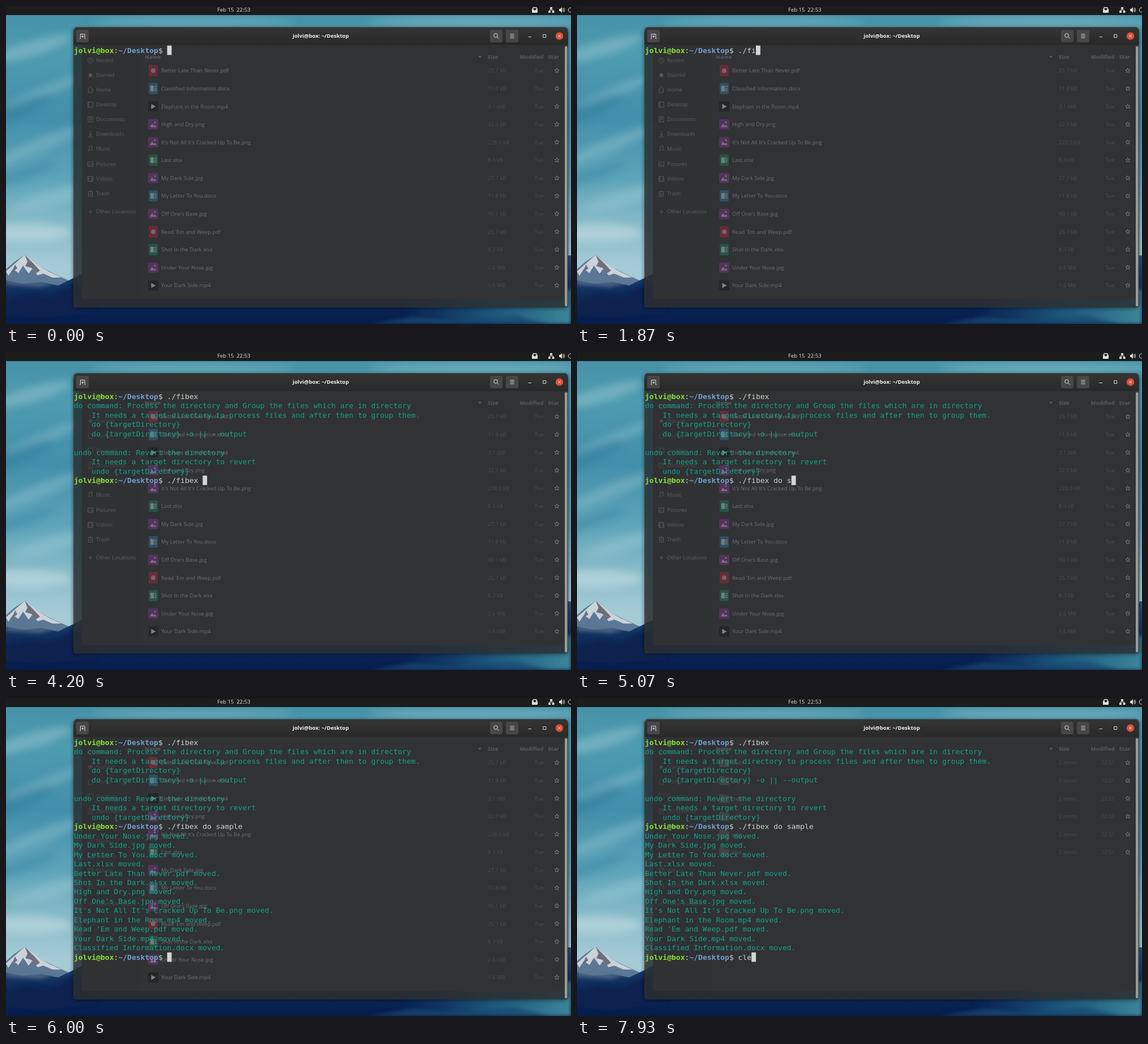
An HTML page that plays this animation: 998 px wide and 561 px high, repeating every 8000 ms.

```html
<!DOCTYPE html>
<html lang="en">
<head>
<meta charset="utf-8">
<title>Terminal session</title>
<style>
html, body { margin: 0; width: 100%; height: 100%; overflow: hidden; background: #10233f; }
svg { display: block; width: 998px; height: 561px; }
text { white-space: pre; }
.ui { font: 9.5px "Open Sans", "Noto Sans", sans-serif; }
.bold { font-weight: 700; }
.end { text-anchor: end; }
.mid { text-anchor: middle; }
.term { font: 13.02px "DejaVu Sans Mono", monospace; fill: #d0d3cf; }
.out { fill: #16a089; }
.user { fill: #8ae234; font-weight: 700; }
.path { fill: #729fcf; font-weight: 700; }
.line { fill: none; stroke: currentColor; }
use { opacity: .55; }
</style>
</head>
<body>
<svg viewBox="0 0 998 561">
  <defs>
    <linearGradient id="sky" x1="0" y1="0" x2="0" y2="1">
      <stop offset="0" stop-color="#438fa6"/>
      <stop offset=".15" stop-color="#4f9bb0"/>
      <stop offset=".35" stop-color="#438fab"/>
      <stop offset=".55" stop-color="#5fa5ba"/>
      <stop offset=".7" stop-color="#8bbdca"/>
      <stop offset=".82" stop-color="#a5cbd5"/>
    </linearGradient>
    <linearGradient id="hill" x1="0" y1="0" x2="0" y2="1">
      <stop offset="0" stop-color="#2c5480"/>
      <stop offset=".55" stop-color="#0f2c5c"/>
      <stop offset="1" stop-color="#061c4c"/>
    </linearGradient>
    <linearGradient id="haze" x1="0" y1="0" x2="1" y2="0">
      <stop offset=".5" stop-color="#1d5a80" stop-opacity="0"/>
      <stop offset=".75" stop-color="#256a8a" stop-opacity=".7"/>
      <stop offset="1" stop-color="#3d8799"/>
    </linearGradient>
    <linearGradient id="bar" x1="0" y1="0" x2="0" y2="1">
      <stop offset="0" stop-color="#343434"/>
      <stop offset="1" stop-color="#292929"/>
    </linearGradient>
    <filter id="soft" x="-50%" y="-80%" width="200%" height="260%"><feGaussianBlur stdDeviation="7"/></filter>
    <filter id="fuzz" x="-20%" y="-20%" width="140%" height="140%"><feGaussianBlur stdDeviation="3"/></filter>

    <symbol id="pdf" overflow="visible">
      <rect x="-8" y="-10" width="16" height="20" rx="2" fill="#94283f"/>
      <circle r="4" fill="#b98a95"/>
    </symbol>
    <symbol id="docx" overflow="visible">
      <rect x="-8" y="-10" width="16" height="20" rx="2" fill="#2f6a8c"/>
      <path d="M-5-5h6v10h-6zM2-4h4v1.5H2zM2-.7h4v1.5H2zM2 2.6h4v1.5H2z" fill="#a9bac2"/>
    </symbol>
    <symbol id="xlsx" overflow="visible">
      <rect x="-8" y="-10" width="16" height="20" rx="2" fill="#1d7554"/>
      <path d="M-5-5h6v10h-6zM2-4h4v1.5H2zM2-.7h4v1.5H2zM2 2.6h4v1.5H2z" fill="#a9beb4"/>
    </symbol>
    <symbol id="image" overflow="visible">
      <rect x="-9" y="-9" width="18" height="18" rx="2" fill="#71367f"/>
      <path d="M-6 5l4-6 3 4 2-2 3 4z" fill="#b9a3bf"/>
      <circle cx="3" cy="-3.5" r="1.5" fill="#b9a3bf"/>
    </symbol>
    <symbol id="video" overflow="visible">
      <rect x="-9" y="-9" width="18" height="18" rx="2" fill="#1c1e20"/>
      <path d="M-3.5-4.5v9l8-4.5z" fill="#c2c3c4"/>
    </symbol>
    <symbol id="folder" overflow="visible">
      <path d="M-9-6q0-2 2-2h5l2 2h7q2 0 2 2v10q0 2-2 2H-7q-2 0-2-2z" fill="#515356"/>
    </symbol>
  </defs>

  <!-- wallpaper -->
  <rect width="998" height="561" fill="url(#sky)"/>
  <g filter="url(#soft)" fill="#8fc2cd">
    <ellipse cx="45" cy="75" rx="75" ry="13" transform="rotate(-16 45 75)" opacity=".55"/>
    <ellipse cx="70" cy="150" rx="75" ry="9" transform="rotate(-22 70 150)" opacity=".45"/>
    <ellipse cx="20" cy="185" rx="70" ry="14" transform="rotate(-24 20 185)" fill="#34809f" opacity=".6"/>
    <ellipse cx="60" cy="245" rx="85" ry="12" transform="rotate(-22 60 245)" opacity=".45"/>
    <ellipse cx="20" cy="300" rx="70" ry="12" transform="rotate(-18 20 300)" fill="#3f8ba8" opacity=".55"/>
    <ellipse cx="80" cy="340" rx="75" ry="15" transform="rotate(-16 80 340)" opacity=".6"/>
    <ellipse cx="35" cy="400" rx="80" ry="16" fill="#c2dde2" opacity=".6"/>
    <ellipse cx="330" cy="28" rx="180" ry="7" opacity=".45"/>
    <ellipse cx="830" cy="28" rx="190" ry="9" opacity=".5"/>
  </g>
  <path d="M0 464L14 452 33 439 47 449 62 461 84 472 119 488 160 500 160 561H0z" fill="#5c7896"/>
  <path d="M0 468L16 454 33 439 47 449 62 461 78 470 98 479 82 479 66 472 56 475 46 464 40 472 30 458 22 471 12 464 4 476z" fill="#cbd3da"/>
  <path d="M33 439L38 451 34 459 45 462 52 472 60 467 50 456zM16 456L20 463 10 470z" fill="#6d6f7c"/>
  <path d="M0 484L30 490 62 487 92 493 119 480 200 440 998 440V561H0z" fill="url(#hill)"/>
  <g filter="url(#fuzz)">
    <path d="M0 478L30 476 60 484 88 488 60 496 0 492z" fill="#5b7691" opacity=".7"/>
    <path d="M0 520L40 508 80 512 125 488 160 540 60 550 0 545z" fill="#0a2450"/>
    <path d="M400 561L520 530 640 510 998 500V561z" fill="url(#haze)"/>
    <path d="M640 561L720 548 800 556 900 545 960 561z" fill="#174a72" opacity=".7"/>
  </g>

  <!-- top panel -->
  <rect width="998" height="16" fill="#1c1c1c"/>
  <text class="ui" x="373" y="10.4" fill="#e2e2e2">Feb 15  22:53</text>
  <g fill="#dedede" color="#dedede">
    <path d="M931 2h6l2 4v5q0 1-1 1h-8q-1 0-1-1V6zM931 6h1.500q.5 2 1.500 2t1.500-2H937l-1-2.500h-4z" fill-rule="evenodd"/>
    <path d="M961 2h4v3.500h-4zM958 8.500h4V12h-4zM964.500 8.500h4V12h-4z"/>
    <path class="line" d="M963 5v2M960 9V7h6.500v2"/>
    <path d="M977 5h2l3-3v10l-3-3h-2z"/>
    <path class="line" d="M983.500 4.500q2 2.500 0 5M985.200 3q3 4 0 8"/>
    <path class="line" d="M998.500 3.200a4 4 0 1 0 0 7.600"/>
  </g>

  <!-- terminal window -->
  <rect x="118" y="39" width="876" height="495" rx="8" opacity=".4" filter="url(#fuzz)"/>
  <path d="M119 69H993V527q0 5-5 5H124q-5 0-5-5z" fill="#303436" fill-opacity=".78"/>
  <rect x="134" y="69" width="853" height="448" fill="#303234"/>
  <rect x="134" y="69" width="104" height="448" fill="#2f3133"/>
  <path d="M119 69V45q0-8 8-8H985q8 0 8 8V69z" fill="url(#bar)"/>
  <path class="line" d="M119.500 46q0-8.500 8-8.500H984.500q8 0 8 8.500" color="#484848"/>
  <g fill="#474747">
    <rect x="124" y="42" width="22" height="22" rx="3"/>
    <rect x="855" y="42" width="22" height="22" rx="3"/>
    <rect x="883" y="42" width="22" height="22" rx="3"/>
  </g>
  <g color="#dcdcdc">
    <path class="line" d="M130 57.500h1.500v-8h7.500v8h1.500M135.200 51.500v4.500M133 53.700h4.500"/>
    <circle class="line" cx="865" cy="52" r="3.300"/>
    <path class="line" d="M867.500 54.500l3 3M890.500 50h7M890.500 53h7M890.500 56h7M922.500 54.500h5.500M948.700 50.500h5v5h-5z"/>
  </g>
  <circle cx="977.500" cy="53" r="6.800" fill="#dc4f35"/>
  <path class="line" d="M975.200 50.700l4.600 4.600m0-4.600l-4.600 4.600" color="#fff"/>
  <text class="ui bold mid" x="556" y="56.300" fill="#f0f0f0">jolvi@box: ~/Desktop</text>

  <g id="side" class="ui" fill="#5e6062" color="#56585a"></g>
  <g class="ui bold" fill="#5a5c5e">
    <text x="245" y="92.500">Name</text>
    <path d="M834 88h6l-3 3.500z"/>
    <text x="851" y="92.500">Size</text>
    <text class="end" x="949.500" y="92.500">Modified</text>
    <text class="end" x="977" y="92.500">Star</text>
  </g>
  <g id="files" class="ui"></g>
  <g id="folders" class="ui"></g>
  <rect x="987" y="71" width="4.500" height="459" rx="2.200" fill="#9b9c9a"/>

  <g id="done" class="term"></g>
  <rect id="cursor" width="7.900" height="16.600" fill="#d3d6d1"/>
  <text id="live" class="term" x="120"></text>
</svg>
<script>
const LOOP = 8000, COL = 7.84, ROW = 16.48, LEFT = 120, BASE = 82.8;
const $ = id => document.getElementById(id);

function add(parent, tag, attrs = {}, text = '') {
  const node = document.createElementNS('http://www.w3.org/2000/svg', tag);
  for (const key in attrs) node.setAttribute(key, attrs[key]);
  node.textContent = text;
  return parent.appendChild(node);
}

// sidebar: label, y, icon path centred on 0,0
const places = [
  ['Recent', 96, 'M-4.500 0a4.500 4.500 0 1 0 9 0a4.500 4.500 0 1 0-9 0M0-3V0H2.500'],
  ['Starred', 122, ''],
  ['Home', 148, 'M-5 0L0-4.500 5 0M-3.500-1V4.500h7V-1'],
  ['Desktop', 174, 'M-4.500-4.500h9v9h-9zM-2.500-4.500v9'],
  ['Documents', 200, 'M-4-4.500h8v9h-8zM-2-2h4M-2 0h4M-2 2h2'],
  ['Downloads', 226, 'M0-5V3M-3 0L0 3 3 0M-4 5h8'],
  ['Music', 252, 'M-2 3V-4L3-5V2M-4 3h2M1 2h2'],
  ['Pictures', 279, 'M-4.500-4h9v8h-9zM-3.500 3l3-4 4 4'],
  ['Videos', 305, 'M-4.500-4.500h9v9h-9zM-2.500-4.500v9M2.500-4.500v9'],
  ['Trash', 331, 'M-4.500-3.500h9M-3.500-3.500v8h7v-8M-1.500-5h3M-1-1v3M1-1v3'],
  ['Other Locations', 363, 'M-3.500 0h7M0-3.500v7']
].map(([label, y, icon]) => {
  const g = add($('side'), 'g');
  add(g, 'path', icon
    ? { class: 'line', d: icon, transform: `translate(149 ${y})` }
    : { d: star(4.8), transform: `translate(149 ${y})` });
  add(g, 'text', { x: 159, y: y + 3.4 }, label);
  return { g, y };
});

function star(r) {
  const points = Array.from({ length: 10 }, (_, i) => {
    const a = i * Math.PI / 5, k = i % 2 ? r * .45 : r;
    return (k * Math.sin(a)).toFixed(2) + ' ' + (-k * Math.cos(a)).toFixed(2);
  });
  return 'M' + points.join('L') + 'z';
}

const iconOf = { jpg: 'image', png: 'image', mp4: 'video' };

function listing(parent, items, date, tone) {
  items.forEach(([name, size], i) => {
    const y = 114 + i * 31.58, base = y + 3.4;
    const ext = name.split('.')[1];
    const icon = ext ? iconOf[ext] || ext : 'folder';
    add(parent, 'use', { href: '#' + icon, x: 260, y });
    add(parent, 'text', { x: 274, y: base, fill: tone[0] }, name);
    add(parent, 'text', { x: 851, y: base, fill: tone[1] }, size);
    add(parent, 'text', { x: 949.5, y: base, fill: tone[1], class: 'end' }, date);
    add(parent, 'path', { class: 'line', d: star(4.2), color: '#7c7e7f', transform: `translate(973 ${y})` });
  });
}

listing($('files'), [
  ['Better Late Than Never.pdf', '25.7 kB'],
  ['Classified Information.docx', '11.9 kB'],
  ['Elephant in the Room.mp4', '3.1 MB'],
  ['High and Dry.png', '32.0 kB'],
  ["It's Not All It's Cracked Up To Be.png", '228.0 kB'],
  ['Last.xlsx', '8.3 kB'],
  ['My Dark Side.jpg', '27.7 kB'],
  ['My Letter To You.docx', '11.8 kB'],
  ["Off One's Base.jpg", '90.1 kB'],
  ["Read 'Em and Weep.pdf", '25.7 kB'],
  ['Shot In the Dark.xlsx', '8.3 kB'],
  ['Under Your Nose.jpg', '2.6 MB'],
  ['Your Dark Side.mp4', '1.6 MB']
], 'Tue', ['#6e7072', '#4d4f51']);

listing($('folders'), [
  ['docx', '2 items'], ['jpg', '0 items'], ['mp4', '2 items'],
  ['pdf', '2 items'], ['png', '2 items'], ['xlsx', '2 items']
], '22:53', ['#5a5c5e', '#4a4c4e']);

// terminal
const promptLength = 21;

function promptLine(node, typed) {
  node.textContent = '';
  add(node, 'tspan', { class: 'user' }, 'jolvi@box');
  add(node, 'tspan', {}, ':');
  add(node, 'tspan', { class: 'path' }, '~/Desktop');
  add(node, 'tspan', {}, '$ ' + typed);
}

const moved = `Under Your Nose.jpg
My Dark Side.jpg
My Letter To You.docx
Last.xlsx
Better Late Than Never.pdf
Shot In the Dark.xlsx
High and Dry.png
Off One's Base.jpg
It's Not All It's Cracked Up To Be.png
Elephant in the Room.mp4
Read 'Em and Weep.pdf
Your Dark Side.mp4
Classified Information.docx`.split('\n').map(name => name + ' moved.');

const lines = [
  '$./fibex',
  'do command: Process the directory and Group the files which are in directory',
  '    It needs a target directory to process files and after then to group them.',
  '    do {targetDirectory}',
  '    do {targetDirectory} -o || --output',
  '',
  'undo command: Revert the directory',
  '    It needs a target directory to revert',
  '    undo {targetDirectory}',
  '$./fibex do sample',
  ...moved
].map((line, i) => {
  const isPrompt = line[0] === '$';
  const node = add($('done'), 'text', { x: LEFT, y: BASE + i * ROW, class: isPrompt ? '' : 'out' });
  if (isPrompt) promptLine(node, line.slice(1));
  else node.textContent = line;
  return node;
});

// time, cursor row, typed text (null while a command runs), cursor shown
const steps = [
  [0, 0, '', 1], [600, 0, '', 0],
  [730, 0, '.', 1], [1400, 0, './', 1], [1730, 0, './f', 1], [1870, 0, './fi', 1],
  [2000, 0, './fib', 1], [2130, 0, './fibex ', 1], [2330, 1, null, 1],
  [2470, 9, '', 1], [2930, 9, '', 0], [3530, 9, '', 1],
  [4200, 9, './fibex ', 1], [4730, 9, './fibex d', 1], [4870, 9, './fibex do', 1],
  [4930, 9, './fibex do ', 1], [5000, 9, './fibex do s', 1], [5130, 9, './fibex do sa', 1],
  [5200, 9, './fibex do sam', 1], [5400, 9, './fibex do samp', 1],
  [5530, 9, './fibex do sampl', 1], [5670, 9, './fibex do sample', 1], [5870, 10, null, 1],
  [6000, 23, '', 1], [6400, 23, '', 0], [7000, 23, '', 1],
  [7530, 23, 'c', 1], [7670, 23, 'cl', 1], [7930, 23, 'cle', 1]
];
const SORTED = 6070;

const show = (node, on) => node.setAttribute('visibility', on ? 'visible' : 'hidden');

function draw(now) {
  const t = now % LOOP;
  const [, row, typed, lit] = steps.findLast(step => step[0] <= t);
  const running = typed === null;

  lines.forEach((node, i) => show(node, i < row));
  show($('live'), !running);
  $('live').setAttribute('y', BASE + row * ROW);
  promptLine($('live'), typed || '');

  const col = running ? 0 : promptLength + typed.length;
  $('cursor').setAttribute('x', LEFT + col * COL);
  $('cursor').setAttribute('y', 69.8 + row * ROW);
  show($('cursor'), lit);

  show($('files'), t < SORTED);
  show($('folders'), t >= SORTED);
  const dimTo = row >= 23 ? 450 : row >= 9 ? 235 : 0;
  places.forEach(({ g, y }) => g.setAttribute('opacity', y < dimTo ? .5 : 1));
}

const start = performance.now();
function tick() {
  draw(performance.now() - start);
  requestAnimationFrame(tick);
}
tick();
</script>
</body>
</html>
```
